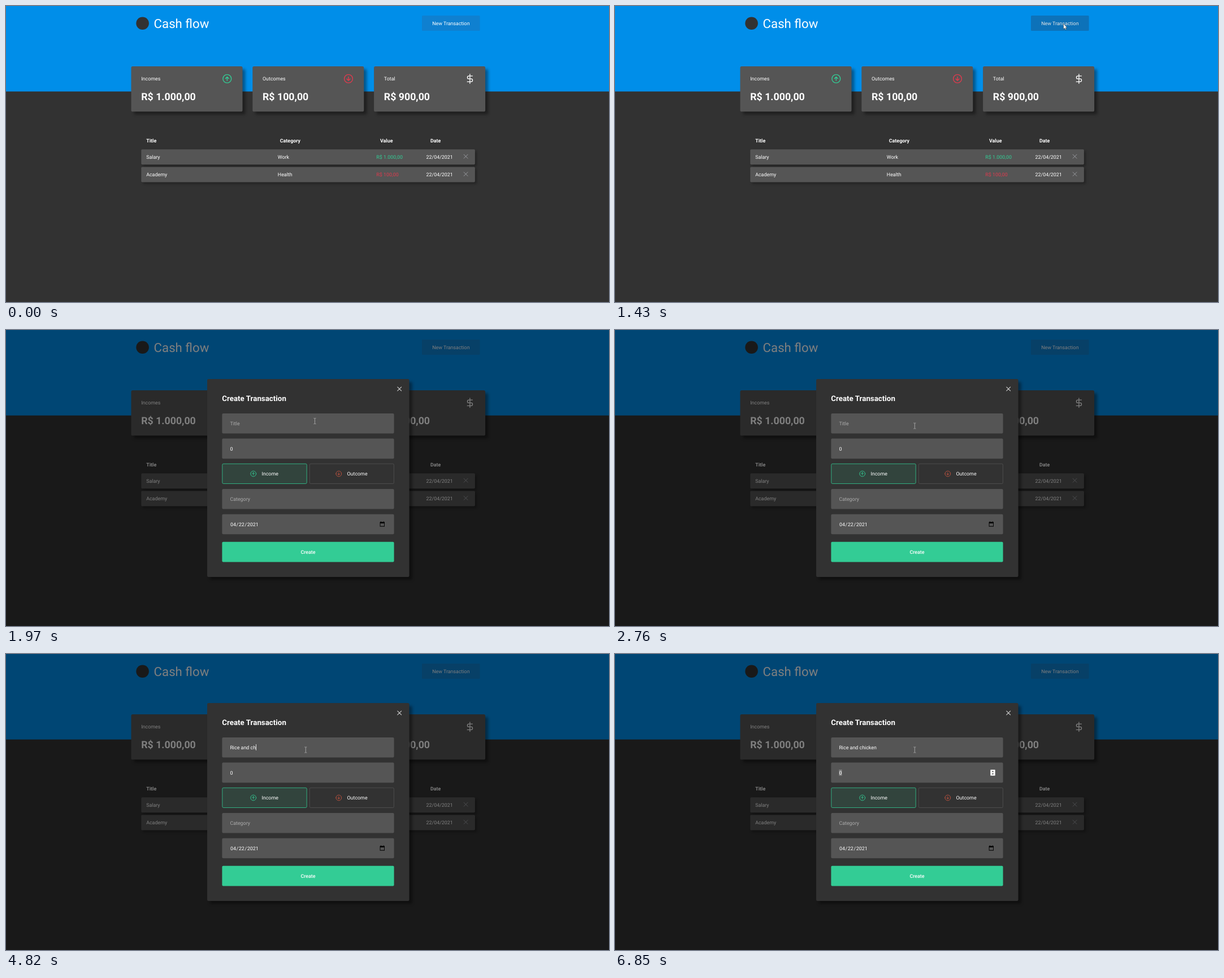
Write an HTML page that moves like this. It is 1067x525 px and loops after 8 s.

```html
<!DOCTYPE html>
<html lang="en">
<head>
<meta charset="utf-8">
<title>Cash flow</title>
<style>
  html, body { margin: 0; height: 100%; overflow: hidden; background: #323232; }
  svg { display: block; font: 8.89px Roboto, sans-serif; fill: #fff; text-rendering: geometricPrecision; white-space: pre; }
  .panel { fill: #555; filter: drop-shadow(5.5px 5.5px 2.8px rgba(0, 0, 0, .4)); }
  .row { fill: #555; filter: drop-shadow(3px 3px 2px rgba(0, 0, 0, .3)); }
  .field { fill: #555; }
  .bold { font-weight: 700; }
  .amount { font-size: 17.78px; font-weight: 700; }
  .hint { fill: #acacac; }
  .mid { text-anchor: middle; }
  .line { fill: none; stroke: currentColor; stroke-linecap: round; stroke-linejoin: round; }
  .green { color: #33cc95; }
  .red { color: #e03a4e; }
</style>
</head>
<body>
<svg width="1067" height="525" viewBox="0 0 1067 525">
  <defs>
    <g id="up" class="line"><circle r="7.4"/><path d="M0 3.2V-3.2M-3 -.2L0 -3.2L3 -.2"/></g>
    <path id="cross" class="line" d="M-3.4-3.4L3.4 3.4M3.4-3.4L-3.4 3.4"/>
  </defs>

  <rect width="1067" height="525" fill="#323232"/>
  <rect width="1067" height="151.6" fill="#008ee9"/>
  <circle cx="241.6" cy="30.8" r="11.3" fill="#323232"/>
  <text x="261.6" y="38.8" font-size="22.23">Cash flow</text>
  <g id="button">
    <rect x="736" y="17" width="102.6" height="27" rx="1.5" fill="#0f80d0"/>
    <text class="mid" x="787.4" y="34">New Transaction</text>
  </g>

  <g id="cards"></g>
  <use href="#up" class="green" x="391.3" y="129" stroke-width="1.4"/>
  <use href="#up" class="red" transform="translate(606 129) rotate(180)" stroke-width="1.4"/>
  <path class="line" color="#fff" stroke-width="1.3" d="M820.9 121V137.4M825.4 124.1H819a2.5 2.5 0 0 0 0 5.1H823a2.5 2.5 0 0 1 0 5.1H816.2"/>

  <g class="bold">
    <text x="248.2" y="241.6">Title</text>
    <text x="484.8" y="241.6">Category</text>
    <text x="662" y="241.6">Value</text>
    <text x="751" y="241.6">Date</text>
  </g>
  <g id="rows"></g>
  <rect id="corner" x="1048.5" y="517" width="19" height="8" fill="#505050"/>

  <g id="modal">
    <rect width="1067" height="525" fill="#000" opacity=".5"/>
    <rect class="panel" style="fill:#323232" x="356" y="87" width="357.6" height="351" rx="2.5"/>
    <use href="#cross" x="696.2" y="104.5" color="#d0d0d0" stroke-width="1.1"/>
    <text class="bold" x="382.3" y="126.3" font-size="13.34">Create Transaction</text>
    <g id="fields"></g>

    <text id="title" x="396.4" y="169"></text>
    <rect id="caret" y="160" width=".8" height="11"/>
    <g id="focus">
      <rect x="396.2" y="205" width="5.4" height="11" fill="#7c7c7c"/>
      <rect x="664.3" y="205.3" width="8.4" height="10.4" rx=".6"/>
      <path d="M666.6 209.3L668.5 207L670.4 209.3ZM666.6 211.7L668.5 214L670.4 211.7Z" fill="#444"/>
    </g>
    <text x="396.4" y="213.7">0</text>

    <rect x="382.8" y="237.3" width="149.4" height="35.2" rx="2" fill="#33cc95" fill-opacity=".11" stroke="#33cc95" stroke-width=".8"/>
    <rect x="537.2" y="237.3" width="149.2" height="35.2" rx="2" fill="none" stroke="#555" stroke-width=".8"/>
    <use href="#up" class="green" transform="translate(437.7 255) scale(.66)" stroke-width="1.4"/>
    <use href="#up" color="#c0533f" transform="translate(588.8 255) scale(.66) rotate(180)" stroke-width="1.4"/>
    <text x="452.4" y="258.3">Income</text>
    <text x="603.5" y="258.3">Outcome</text>

    <text class="hint" x="396.4" y="303">Category</text>
    <text x="397" y="347.7" dx="0 0 .6 .6 0 .6 .6">04/22/2021</text>
    <path d="M661.6 340.6H663V339.5H664V340.6H667.6V339.5H668.6V340.6H670V348.7H661.6ZM662.5 343V347.8H669.1V343Z" fill="#000" fill-rule="evenodd"/>
    <rect x="382.4" y="375.8" width="304.2" height="35.6" rx="2" fill="#33cc95"/>
    <text class="mid" x="534.5" y="397" font-weight="500">Create</text>
  </g>

  <path id="arrow" d="M0 0V9.3L2.1 7.4L3.5 10.5L5 9.8L3.6 6.8H6.4Z" stroke="#222" stroke-width=".5"/>
  <path id="beam" d="M-2-5H-.6L0-4.5L.6-5H2M0-4.5V4.5M-2 5H-.6L0 4.5L.6 5H2" fill="none" stroke="#b8b8b8" stroke-width=".8"/>
</svg>
<script>
const $ = id => document.getElementById(id);
const show = (id, on) => $(id).style.display = on ? '' : 'none';
const clamp = v => Math.max(0, Math.min(1, v));

$('cards').innerHTML = [['Incomes', '1.000,00'], ['Outcomes', '100,00'], ['Total', '900,00']].map(([label, sum], i) => {
  const x = 221.5 + i * 214.8;
  return `<rect class="panel" x="${x}" y="107" width="197" height="80.3" rx="2.6"/>
    <text x="${x + 17.7}" y="132.3">${label}</text>
    <text class="amount" x="${x + 17.7}" y="166.6">R$ ${sum}</text>`;
}).join('');

$('rows').innerHTML = [['Salary', 'Work', '1.000,00', 'green'], ['Academy', 'Health', '100,00', 'red']].map(([name, kind, sum, tone], i) => {
  const y = 254.2 + i * 31.3, base = y + 16.5;
  return `<rect class="row" x="239.3" y="${y}" width="590.6" height="27" rx="1.8"/>
    <text x="248.2" y="${base}">${name}</text>
    <text x="480.8" y="${base}">${kind}</text>
    <text class="${tone}" fill="currentColor" x="655.3" y="${base}">R$ ${sum}</text>
    <text x="743.6" y="${base}">22/04/2021</text>
    <use href="#cross" x="813.6" y="${y + 12.6}" color="#9a9ca0" stroke-width="1"/>`;
}).join('');

$('fields').innerHTML = [148, 192.6, 282, 326.7].map(y =>
  `<rect class="field" x="382.4" y="${y}" width="304.2" height="35.6" rx="2"/>`).join('');

const phrase = 'Rice and chicken';
const keyTimes = [2970, 3200, 3350, 3450, 3600, 3750, 3890, 4040, 4300, 4690, 4820, 5450, 5690, 5780, 6300, 6400];
const OPEN = 1505, CARET = 2280, TAB = 6850;

// Pointer path: time, x, y
const path = [
  [430, 1010, 470], [510, 930, 320], [590, 885, 228], [660, 856, 181], [900, 815, 95], [1200, 796, 40],
  [1280, 793.6, 31.6], [1510, 793.6, 31.6], [1590, 770, 45], [1750, 660, 110], [1900, 560, 155],
  [2050, 531, 169], [2200, 530.3, 170]
];

function pointer(t) {
  const i = path.findIndex(p => p[0] > t);
  if (i < 0) return path[path.length - 1].slice(1);
  const a = path[Math.max(0, i - 1)], b = path[i];
  const k = clamp((t - a[0]) / (b[0] - a[0]));
  return [a[1] + (b[1] - a[1]) * k, a[2] + (b[2] - a[2]) * k];
}

function draw(t) {
  const hover = clamp((t - 1180) / 200) - clamp((t - 1580) / 200);
  $('button').style.filter = `brightness(${1 - .11 * hover})`;
  show('corner', t >= 585 && t < 740);
  show('modal', t >= OPEN);

  // The pointer is sampled about every 77 ms
  const [x, y] = pointer(430 + 77 * Math.floor((t - 424) / 77));
  const overField = t >= OPEN && x < 686 && y > 148;
  show('arrow', t >= 430 && !overField);
  show('beam', overField);
  for (const id of ['arrow', 'beam']) $(id).setAttribute('transform', `translate(${x} ${y})`);

  const typed = keyTimes.filter(k => t >= k).length;
  const title = $('title');
  title.textContent = typed ? phrase.slice(0, typed) : 'Title';
  title.setAttribute('class', typed ? '' : 'hint');

  const since = t - (typed ? keyTimes[typed - 1] : CARET);
  const blinkOff = typed ? 545 : 475;
  show('caret', t >= CARET && t < TAB && since < blinkOff);
  if (t >= OPEN) $('caret').setAttribute('x', 396.4 + (typed ? title.getSubStringLength(0, typed) : 0));
  show('focus', t >= TAB);
}

function loop() {
  draw(performance.now() % 8000);
  requestAnimationFrame(loop);
}
loop();
</script>
</body>
</html>
```
